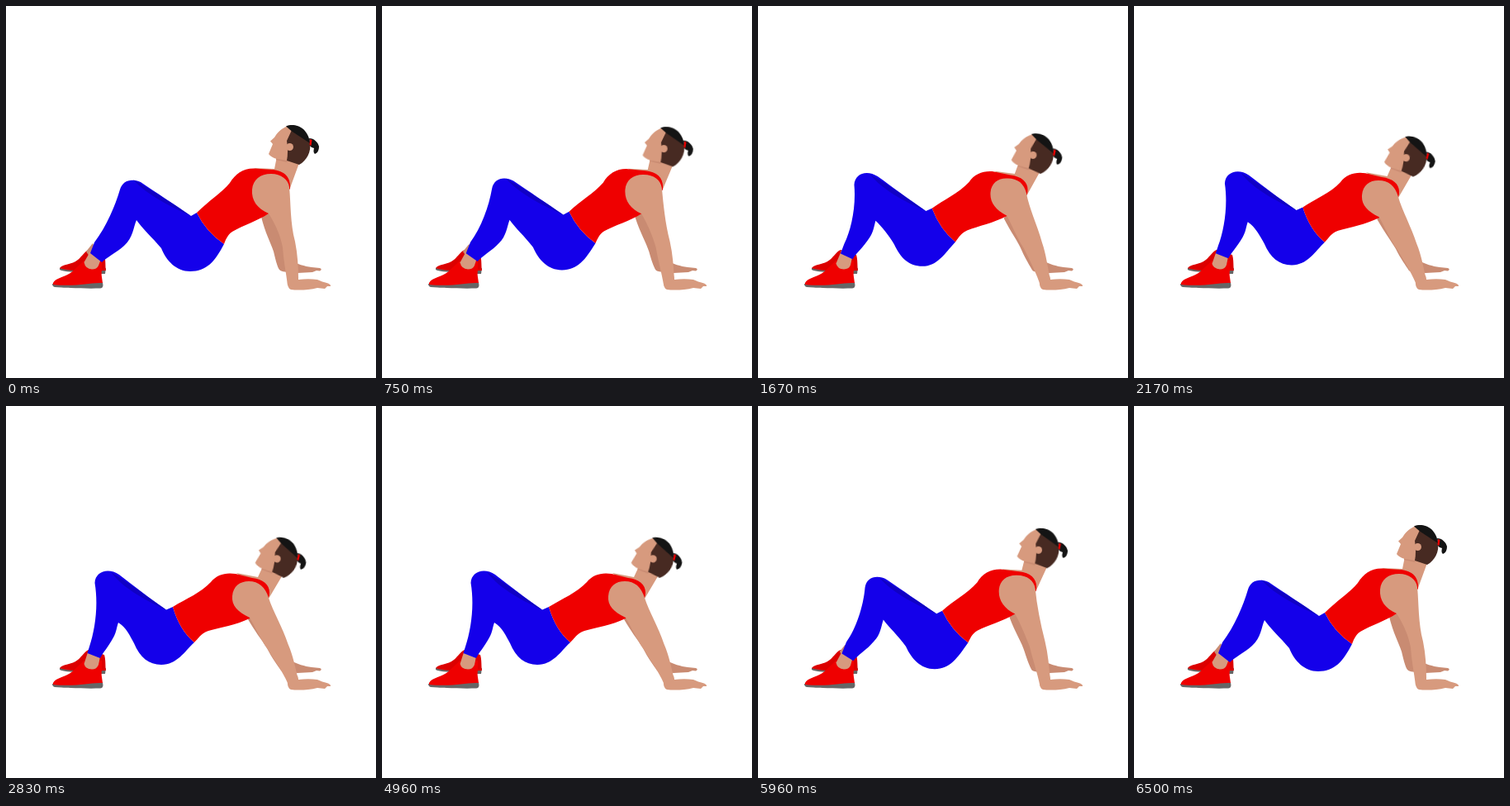
An HTML page that plays this animation: 448x450 px, repeating every 6540 ms.

```html
<!DOCTYPE html>
<html lang="en">
<head>
<meta charset="utf-8">
<title>Reverse plank exercise</title>
<style>
html, body { margin: 0; width: 100%; height: 100%; overflow: hidden; background: #fff; }
svg { display: block; width: 448px; height: 450px; }

.skin { fill: #d79a7e; }
.far-skin { fill: #c98b72; }
.red { fill: #ef0000; }
.far-red { fill: #dc0000; }
.blue { fill: #1400ea; }
.navy { fill: #1000c4; }
.sole { fill: #666; }
.hair { fill: #472a22; }
.black { fill: #141414; }

/* --a: raised, --b: halfway, --c: lowered */
.move { animation: dip 6540ms infinite; }
@keyframes dip {
  0% { d: var(--a); transform: var(--ta, none); }
  4.43% { d: var(--a); transform: var(--ta, none); animation-timing-function: cubic-bezier(.45, .1, .8, .7); }
  18.5% { d: var(--b); transform: var(--tb, none); animation-timing-function: cubic-bezier(.33, .36, .45, 1); }
  43.27% { d: var(--c); transform: var(--tc, none); }
  75.38% { d: var(--c); transform: var(--tc, none); animation-timing-function: cubic-bezier(.4, 0, .7, .55); }
  88.07% { d: var(--b); transform: var(--tb, none); animation-timing-function: cubic-bezier(.3, .5, .6, 1); }
  99.39%, 100% { d: var(--a); transform: var(--ta, none); }
}

.head {
  transform-origin: 320px 163px;
  --ta: translate(0px, 0px) rotate(0deg);
  --tb: translate(-6.5px, 5px) rotate(4deg);
  --tc: translate(-14px, 11px) rotate(8.5deg);
}
.leg {
  --a: path("M231 250L224 254C205 241 181 225 163 213C152 208 141 211 138 222C132 242 122 266 107 286L102 299L116 310C122 304 134 298 143 290C154 280 154 268 158 259C165 269 177 280 188 293C194 308 206 321 223 321C243 321 253 309 264 288Q242 273 231 250Z");
  --b: path("M217 246L210 249C190 236 169 220 151 208C138 200 124 204 123 218C124 244 116 272 107 285L101 300L115 307C119 300 130 293 139 280C144 273 145 267 147 258C153 266 164 276 172 289C180 305 190 316 207 316C225 316 232 302 247 285Q228 270 217 246Z");
  --c: path("M202 243L194 246.5C174 233 154 217 137 204C124 195 108 200 107.5 214C112 241 108 270 101 291L98.5 299L114 305C117 299 124 291 130 280C134 273 134 267 136 262C146 268 150 278 155 287C162 304 173 313 188 313C207 313 216 297 228 286Q210 271 202 243Z");
}
.far-leg {
  --a: path("M154 210C180 224 205 241 224 254C203 244 172 230 154 210Z");
  --b: path("M141 205C168 219 190 236 210 249C189 240 159 226 141 205Z");
  --c: path("M127 201C153 216 174 233 194 246.5C173 237 143 222 127 201Z");
}
.torso {
  --a: path("M231 250C245 236 261 226 271 214C278 203 286 196.500 300 196.500L322 198C338 199 345 208 344 221L318 251C305 260 287 265 274 273C268 277 266 283 264 288Q242 273 231 250Z");
  --b: path("M217 246C230 235 248 227 261 213C267 202 280 197 292 198.500L311 202C328 204 335 214 331 226L306 252C290 261 272 265 259 271C252 275 250 280 247 285Q228 270 217 246Z");
  --c: path("M202 243C218 233 236 226 248 213C255 204 266 201 278 203L298 208C314 210 322 219 318 232L295 257C278 265 260 268 245 272C236 275 233 281 228 286Q210 271 202 243Z");
}
.neck {
  --a: path("M328 182L325 197L300 196L344 220L355 190L341 185Z");
  --b: path("M319 187L315 200L292 198L331 226L347 196L333 190Z");
  --c: path("M311 194L305 207L279 202L318 233L334 206L322 198Z");
}
.arm {
  --a: path("M298 222C299 210 308 203 321 203C333 203 342 210 343 219C345 240 344 262 350 285C353 300 354 315 354 331L341 338C339 322 336 308 335 292C332 276 326 264 318 251C304 245 297 235 298 222Z");
  --b: path("M287 222C288 211 297 205 308 206C321 206 328 212 330 222C332 242 340 262 345.5 284C350 300 351 316 354 331L342 339C337 322 330 305 324 290C316 276 312 264 306 252C292 244 286 234 287 222Z");
  --c: path("M274 230C275 218 283 212 294 212C306 212 314 219 318 232C323 248 335 268 341.5 288C348 303 350 316 354 331L343 340C338 326 328 312 318 296C308 282 302 268 295 256C280 249 273 241 274 230Z");
}
.far-arm {
  --a: path("M309 255C314 275 320 285 324 297C327 310 329 316 331 319Q333 322 345 322L345 290L318 250Z");
  --b: path("M301 256C310 275 319 287 322 298C326 308 329 314 332 320Q334 322 345 322L340 290L306 250Z");
  --c: path("M293 258C301 272 309 282 316 293C322 305 329 314 333 320Q335 322 345 322L340 295L297 252Z");
}
.ankle {
  --a: path("M102 297L115 306L112 314Q110 318.500 104 318.500Q96 318 94.500 310Z");
  --b: path("M101 298L114 305L112 314Q110 318.500 104 318.500Q96 318 94.500 311Z");
  --c: path("M99 298L114 303L112 313Q110 318.500 104 318.500Q96 318 94.500 312Z");
}
.far-ankle {
  --a: path("M105 287L97 297L101 303L109 295Z");
  --b: path("M106 290L100 297L104 303L110 295Z");
  --c: path("M105 292L100 297L104 303L110 295Z");
}
</style>
</head>
<body>
<svg viewBox="0 0 448 450">
  <!-- far side -->
  <path class="move far-arm far-skin"/>
  <path class="far-skin" d="M345 308C352 312 362 315 370 316L380 317Q383.500 318.500 380 320.500L376 320L371 322C362 322 352 324 345 322Z"/>
  <path class="sole" d="M65 317L121 317L120 324L110 324L92 322Q70 322 65 319Z"/>
  <path class="far-red" d="M65 317C68 312 80 313 87 307C92 303 96 296 100 295L119 301C121 308 120 314 121 320L90 321C80 319 72 320 65 317Z"/>
  <path class="move far-ankle far-skin"/>

  <!-- near foot -->
  <path class="sole" d="M56 336L117 334L117.500 338Q117 341.500 114 341.500C95 342 70 341 59 340Q56 339 56 336Z"/>
  <path class="red" d="M57 335C60 329 70 328 78 323C85 318 90 311 95 308C95 316 99 318 104 318C109 318 111 314 112 309L116 308C117 316 115 322 116 328L117 335C100 334 88 340 57 337Z"/>
  <path class="move ankle skin"/>

  <path class="move leg blue"/>
  <path class="move far-leg navy"/>
  <path class="move neck skin"/>
  <path class="move torso red"/>

  <g class="move head">
    <path class="far-skin" d="M327 182L341 186L340 189L327 186Z"/>
    <path class="skin" d="M340 145.500C332 149 328 154 325 159L320 163.500L323 167L318 179Q321 183 328 185L341 187L352 170L348 150Z"/>
    <path class="hair" d="M346 150L368 164C370 177 364 187 355 192L340 187Q342 177 340 163Z"/>
    <path class="black" d="M339 145.500C350 141 366 147 368 166L346 151.500Z"/>
    <circle class="skin" cx="343.500" cy="170.500" r="4.500"/>
    <path class="black" d="M367 160C373 160 378 165 379 170Q379 177 374 179Q371.500 177 373 172Q370 172 368 169Z"/>
    <path class="red" d="M368 161L370.500 162L369.500 169L367.500 168Z"/>
  </g>

  <path class="move arm skin"/>
  <path class="skin" d="M341 332L353 326L354 331C362 330 370 330 377 331C385 335 394 335 393 339L389 339L386 342L377 341C366 344 352 344 345 343Q340 341 341 332Z"/>
</svg>
</body>
</html>
```
